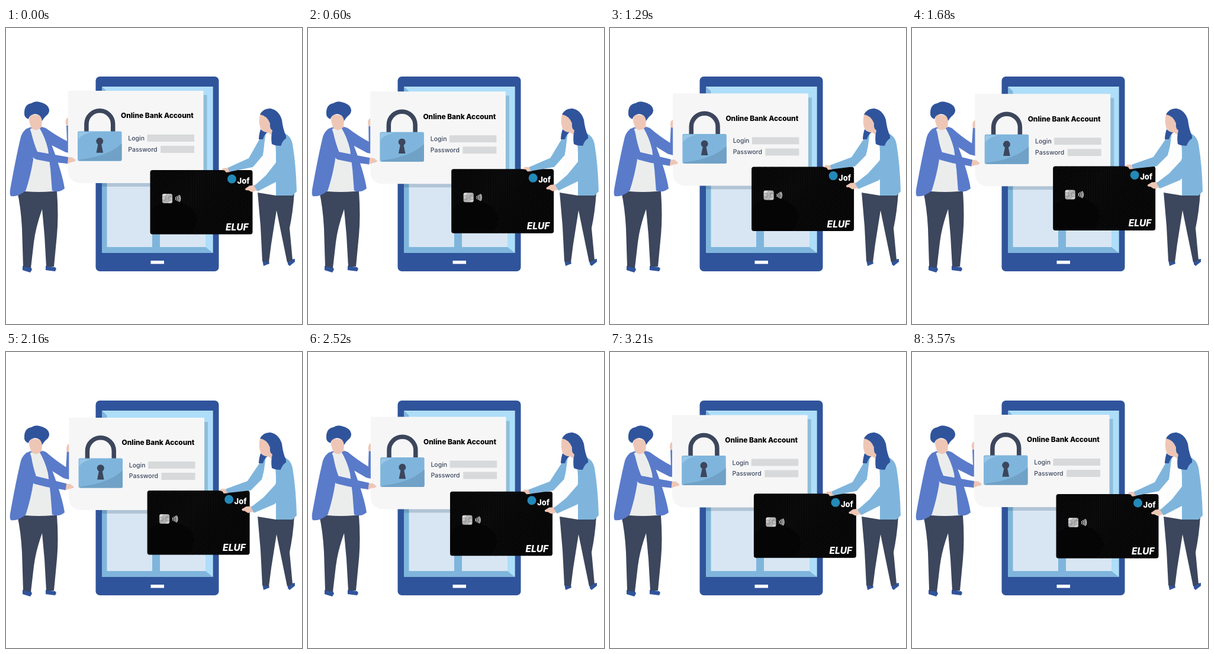
Animation, 500 px wide and 500 px high, one loop 3600 ms. Source, as an HTML page:

```html
<!DOCTYPE html>
<html lang="en">
<head>
<meta charset="utf-8">
<title>Online bank account</title>
<style>
  html, body { margin: 0; width: 100%; height: 100%; overflow: hidden; background: #fff; }
  svg { display: block; width: 100vw; height: 100vh; }
  text { font-family: Inter, "Open Sans", sans-serif; }
  .navy { fill: #30549b; }
  .sky { fill: #7fb5dc; }
  .coat { fill: #5a7bca; }
  .slate { fill: #3c465c; }
  .skin { fill: #eec6b5; }
  .label { font-size: 10.5px; font-weight: 500; fill: #3c465c; }
</style>
</head>
<body>
<svg viewBox="0 0 500 500">
  <defs>
    <clipPath id="screenClip"><rect x="162" y="99" width="187.5" height="281"/></clipPath>
    <clipPath id="cardClip"><rect x="243.5" y="240" width="173" height="108.5" rx="4"/></clipPath>
    <linearGradient id="silver" x2="1" y2="1">
      <stop stop-color="#ececec"/><stop offset=".5" stop-color="#a9a9ab"/><stop offset="1" stop-color="#dcdcdc"/>
    </linearGradient>
  </defs>

  <g id="tablet">
    <rect class="navy" x="151.5" y="82" width="208" height="329" rx="7"/>
    <rect class="sky" x="162" y="99" width="187.5" height="281"/>
    <path fill="#aedef9" d="M162 99H349.5V380L337 370V250H170.5V107Z"/>
    <path fill="#d8e6f4" d="M170.5 250H337V370H260V250H247V370H170.5Z"/>
    <rect fill="#fff" x="244.5" y="393" width="22.5" height="5.5"/>
  </g>

  <g id="manFarArm">
    <path class="coat" d="M60 167L67 169Q85 182 103 191L102 164L109 163L114 212L101 210L77 198Z"/>
    <path class="skin" d="M102 165Q99 157 103 152H109V165Z"/>
  </g>

  <g clip-path="url(#screenClip)">
    <path id="shadow" fill="#173c5c" opacity=".2" d="M111 113H339.5V268H111Z"/>
  </g>

  <g id="panel">
    <path fill="#f6f6f7" d="M104.8 106H332.5Q333.5 106 333.5 107V262H128Q104.8 262 104.8 239Z"/>
    <path fill="none" stroke="#3c465c" stroke-width="7.5" d="M135.9 176V162.2a22.4 22.4 0 0 1 44.8 0V176"/>
    <rect class="sky" x="121" y="174.5" width="74.5" height="50" rx="2.5"/>
    <path fill="#99c7e7" d="M122 188V178Q122 176 124 176H146Q129 178 122 188Z"/>
    <path fill="#70a1c6" d="M126 222Q172 217 195.5 195V222Q195.5 224.5 193 224.5H123Q123 223 126 222Z"/>
    <path class="slate" d="M155.3 196.5A6 6 0 1 1 161.2 196.5L164 210.7H152.5Z"/>
    <text x="194" y="152.3" font-size="11.9" font-weight="800">Online Bank Account</text>
    <text class="label" x="206.3" y="190">Login</text>
    <text class="label" x="206.3" y="208.5">Password</text>
    <path fill="#d7d9da" d="M238.5 180H318V192H238.5ZM261 199H318V211H261Z"/>
  </g>

  <g id="card">
    <rect fill="#050506" x="243.5" y="240" width="173" height="108.5" rx="4"/>
    <g clip-path="url(#cardClip)">
      <path id="dots" fill="none" stroke="#303032" stroke-width=".9" stroke-linecap="round"/>
    </g>
    <rect fill="url(#silver)" x="264" y="280" width="17" height="16" rx="3"/>
    <path fill="none" stroke="#77777a" stroke-width=".6" d="M264 285H270V291H264M281 285H275V291H281M270 285L273 280M275 291L272 296"/>
    <path fill="none" stroke="#fff" stroke-width="1.2" stroke-linecap="round" d="M286.5 286Q288 288 286.5 290M288.8 284.6Q291 288 288.8 291.3M291 283.3Q294 288 291 292.5M293 282.5Q296.3 288 293 293.3"/>
    <circle fill="#2389b8" cx="381.5" cy="255" r="7.5"/>
    <text x="390.5" y="263" font-size="13" font-weight="800" fill="#fff">Jof</text>
    <text x="371" y="342" font-size="15.5" font-weight="800" font-style="italic" fill="#fff">ELUF</text>
  </g>

  <g id="man">
    <path class="navy" d="M28 402L42 404L44 408L41 413L28 409ZM67 402L83 404L85 407L83 411L67 409Z"/>
    <path class="slate" d="M19 276H86Q89 318 86 350L81 403H68L65 350L61 306Q50 337 47 362L42 405L29 403L27 338Q25 302 19 276Z"/>
    <path class="coat" d="M46 167Q30 168 25 184Q17 217 7 273Q6 281 8 284Q20 286 33 275H78Q90 279 99 271Q95 245 78 200L71 174Q68 168 58 167Z"/>
    <path fill="#ebeded" d="M41 170L56 168Q66 184 71 205Q76 240 78 276Q56 278 33 276Q42 248 46 222Z"/>
    <path class="skin" d="M41 146Q37 155 41 163Q41 168 46 171Q53 175 60 167L62 148Z"/>
    <path class="navy" d="M31 143Q31 129 43 127Q50 122 60 126Q73 130 73 140Q72 146 67 149Q64 152 61 157Q60 151 57 148Q50 143 43 147Q39 149 38 154Q30 151 31 143Z"/>
  </g>
  <g id="manNearArm">
    <path class="skin" d="M101 218L112 218.500L118 223Q117 226 111 226.500L102 230Z"/>
    <path class="coat" d="M33 171Q40 168 43 178Q47 195 53 209L76 213L105 218L104 229L72 226L51 222Q44 219 42 212L31 184Z"/>
  </g>

  <g id="womanFarArm">
    <path class="skin" d="M379 236L367 236.500L364.500 240L369 240.500L372 244L379 243Z"/>
    <path class="sky" d="M440 178Q431 179 427 190L410 220L375 236L377 243L417 235L434 215Z"/>
  </g>
  <g id="woman">
    <path class="navy" d="M433 392L444 394L445 398L435 402ZM476 392L488 390V395L479 402L476 399Z"/>
    <path class="slate" d="M425 277H487Q485 310 479 338L484 392L475 396L457 308L448 365L444 396L433 394L430 335Z"/>
    <path fill="#fdfdfe" d="M439 176Q436 195 434 220L425 278L456 283V178Z"/>
    <path class="sky" d="M449 177Q456 192 456 210V283H484L491 276Q490 232 484 196Q481 181 468 177Z"/>
    <path class="skin" d="M429 146Q426 159 430 170Q435 177 442 176L453 183V146L440 140Z"/>
    <path class="navy" d="M429 146Q435 135 447 136Q461 139 466 155Q468 172 473 182Q474 197 464 199Q454 199 449 196Q447 184 450 173Q445 170 446 161Q441 148 429 146ZM430 171Q436 177 442 176Q436 180 434 188H427Q427 181 430 171Z"/>
  </g>
  <g id="womanNearArm">
    <path class="skin" d="M422 265L411 266.500L404 271.500Q404 275 409 274L415 277L425 274Z"/>
    <path class="sky" d="M479 186Q466 184 462 210L457 226L439 249L419 267L425 276L458 259L476 240Z"/>
  </g>
</svg>
<script>
  const LOOP = 3600;
  const $ = id => document.getElementById(id);

  // Fine dots along curved rows give the card its texture.
  let dots = '';
  for (let row = -10; row < 46; row++) {
    for (let col = 0; col < 62; col++) {
      const x = 244 + col * 2.9;
      const y = 238 + row * 2.9 + 14 * Math.sin(col / 11 + row / 14);
      const dark = Math.hypot((x - 280) / 50, (y - 325) / 38);
      if (dark > 0.85) dots += `M${x.toFixed(1)} ${y.toFixed(1)}h.01`;
    }
  }
  $('dots').setAttribute('d', dots);

  const move = (id, x, y) => $(id).setAttribute('transform', `translate(${x} ${y})`);
  const turn = (id, angle, x, y) => $(id).setAttribute('transform', `rotate(${angle} ${x} ${y})`);

  function draw(now) {
    const k = (1 - Math.cos(2 * Math.PI * (now % LOOP) / LOOP)) / 2;
    move('panel', 1.7 * k, 5.4 * k);
    move('shadow', 1.7 * k, 5.4 * k);
    move('card', -5.4 * k, -6.6 * k);
    turn('manFarArm', 6 * k, 66, 175);
    turn('manNearArm', 4.2 * k, 40, 178);
    turn('womanFarArm', 5.2 * k, 432, 192);
    turn('womanNearArm', 4.9 * k, 478, 195);
    requestAnimationFrame(draw);
  }
  draw(performance.now());
</script>
</body>
</html>
```
